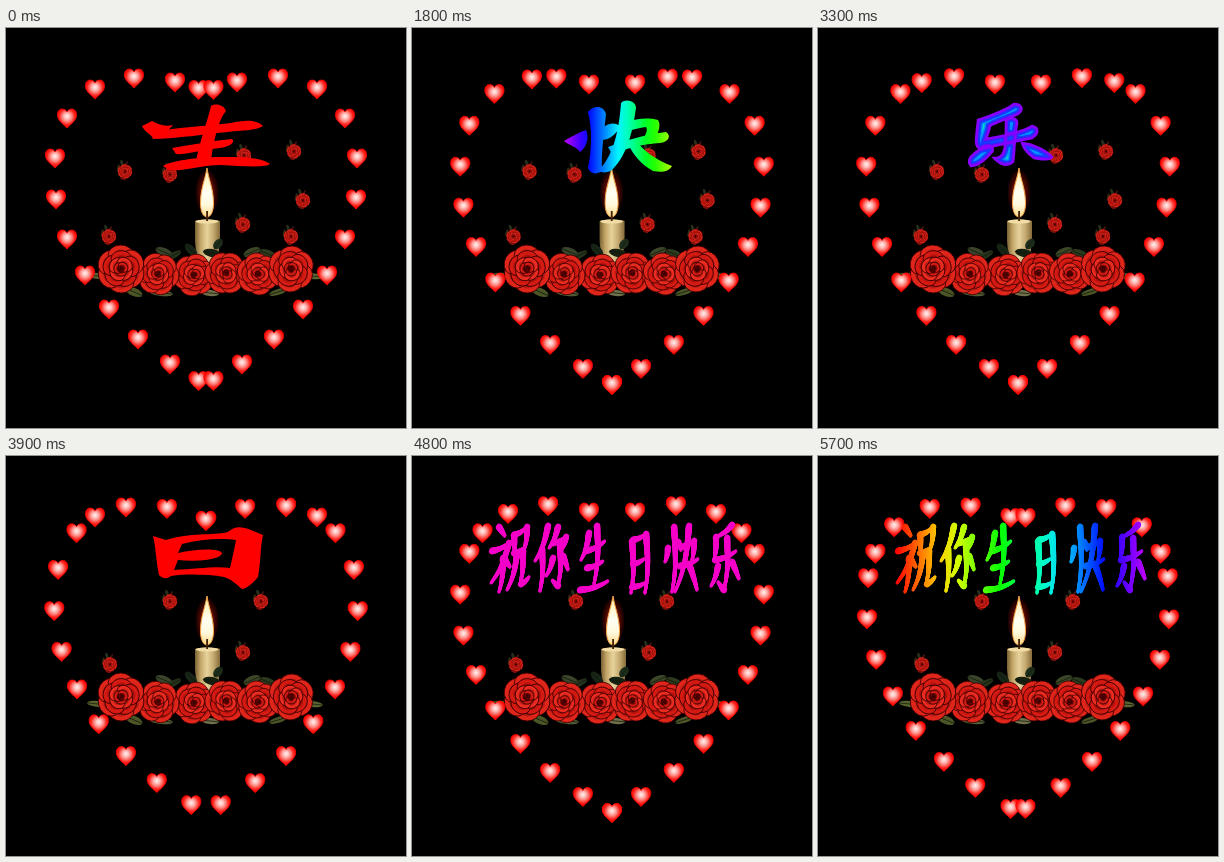
An HTML page with a canvas that plays this animation: 400 px wide and 400 px high, repeating every 6 s.

```html
<!DOCTYPE html>
<html lang="zh">
<head>
<meta charset="utf-8">
<title>生日快乐</title>
<style>
html, body { margin: 0; width: 100%; height: 100%; overflow: hidden; background: #000; }
canvas { display: block; }
</style>
</head>
<body>
<canvas id="stage" width="400" height="400"></canvas>
<script>
const ctx = document.getElementById('stage').getContext('2d');
const STEP = 300, STEPS = 20, TAU = Math.PI * 2;

// ---------- helpers ----------
function at(x, y, draw, scale = 1, turn = 0) {
  ctx.save();
  ctx.translate(x, y);
  ctx.rotate(turn);
  ctx.scale(scale, scale);
  draw();
  ctx.restore();
}
function ellipse(x, y, rx, ry, fill, turn = 0) {
  ctx.beginPath();
  ctx.ellipse(x, y, rx, ry, turn, 0, TAU);
  ctx.fillStyle = fill;
  ctx.fill();
}
function shade(gradient, ...colors) {
  colors.forEach((c, i) => gradient.addColorStop(i / (colors.length - 1), c));
  return gradient;
}
function rainbow(x0, x1, hue0, hue1) {
  const hues = Array.from({ length: 13 }, (_, i) => `hsl(${hue0 + (hue1 - hue0) * i / 12} 100% 50%)`);
  return shade(ctx.createLinearGradient(x0, 0, x1, 0), ...hues);
}

// ---------- travelling hearts ----------
// Left half of the track, one point per five steps, starting one step before the notch.
const TRACK = [[246, 79], [208, 67], [169, 54], [128, 50], [89, 61], [61, 90], [49, 130], [50, 171],
  [61, 211], [79, 247], [103, 281], [132, 311], [164, 336], [200, 356.5], [238, 376]];
const TRACK_END = 59;

function trackPoint(step) {
  const u = (step + 1) / 5, n = Math.min(Math.floor(u), TRACK.length - 4), t = u - n;
  const [a, b, c, d] = TRACK.slice(n, n + 4);
  return [0, 1].map(i => b[i] + t / 2 * (c[i] - a[i]
    + t * (2 * a[i] - 5 * b[i] + 4 * c[i] - d[i] + t * (3 * (b[i] - c[i]) + d[i] - a[i]))));
}
// u is offset so that step -1 lies on the second track point
const heartAt = step => trackPoint(step);

const heartShape = new Path2D('M0 10.5 C-3 7 -10 3 -10 -3 C-10 -8 -7 -9.3 -5 -9.3 C-2.5 -9.3 -.8 -8 0 -6.2 C.8 -8 2.5 -9.3 5 -9.3 C7 -9.3 10 -8 10 -3 C10 3 3 7 0 10.5Z');
const heartFill = shade(ctx.createRadialGradient(0, -2, 0, 0, -1, 10.5),
  '#fff0ee', '#ffc4c0', '#ff807a', '#ff2a24', '#fa0000');

function drawHearts(k) {
  const steps = [1 + k];
  for (let s = k - 3; s >= 0; s -= 5) steps.push(s);
  for (let s = 4 + k; s <= TRACK_END + 2; s += 5) steps.push(s);
  for (const s of steps) {
    const [x, y] = heartAt(Math.min(s, TRACK_END, 58 + k));
    for (const hx of [x, 400 - x]) at(hx, y, () => {
      ctx.fillStyle = heartFill;
      ctx.fill(heartShape);
      ctx.strokeStyle = '#f00';
      ctx.lineWidth = .8;
      ctx.stroke(heartShape);
    }, .96);
  }
}

// ---------- roses and candle ----------
function petals(count, dist, size, start, light, dark) {
  for (let i = 0; i < count; i++) {
    const a = start + i * TAU / count;
    at(Math.cos(a) * dist, Math.sin(a) * dist, () => {
      ellipse(0, 0, size * .8, size, shade(ctx.createRadialGradient(-size * .5, 0, 0, 0, 0, size), dark, dark, light, light), 0);
      ctx.strokeStyle = '#3c0000';
      ctx.lineWidth = .035;
      ctx.stroke();
    }, 1, a);
  }
}
function drawRose(x, y, r, turn) {
  at(x, y, () => {
    ellipse(0, 0, .85, .85, '#500');
    petals(6, .56, .5, 0, '#e0251a', '#4a0000');
    petals(5, .4, .42, .5, '#d41a12', '#600');
    petals(4, .23, .33, .2, '#ec2c20', '#5a0000');
    petals(3, .11, .22, .9, '#d81c14', '#400');
    ctx.strokeStyle = '#4a0000';
    ctx.lineWidth = .06;
    ctx.beginPath();
    ctx.arc(0, 0, .12, 0, 4.4);
    ctx.stroke();
  }, r, turn);
}
function drawBud(x, y) {
  at(x, y, () => {
    ellipse(-2, -7, 1.6, 4, '#26301a', -.3);
    ellipse(-6, -2, 1.3, 4, '#3a2a14', .2);
    ellipse(2, -6, 1.2, 4, '#3c1510', .5);
    drawRose(1, 1.5, 8, .4);
    ellipse(-1, 9, 3, 1.2, '#7c100c', .3);
  }, .95);
}
function leaf(x, y, rx, ry, turn, color) {
  ellipse(x, y, rx, ry, color, turn);
  at(x, y, () => {
    ctx.strokeStyle = '#10180a';
    ctx.lineWidth = .7;
    ctx.beginPath();
    ctx.moveTo(-rx, 0);
    ctx.lineTo(rx, 0);
    ctx.stroke();
  }, 1, turn);
}
const flame = new Path2D('M0 -25 C1.5 -14 6.5 -4 6.5 10 C6.5 18 4 24 0 24 C-4 24 -6.5 18 -6.5 10 C-6.5 -4 -2 -13 0 -25Z');

function drawCandle(x) {
  at(x, 165, () => {
    ctx.save();
    ctx.scale(.5, 1);
    ellipse(0, 0, 23, 23, shade(ctx.createRadialGradient(0, 0, 5, 0, 0, 23), '#a02008', '#6a1004', '#380500', '#100000'));
    ctx.restore();
    const wax = shade(ctx.createLinearGradient(-13, 0, 13, 0), '#6b5527', '#c2a567', '#e8d39c', '#c4a970', '#866c3a');
    ctx.fillStyle = wax;
    ctx.fill(new Path2D('M-12 28 C-8 26 8 26 13 28 L13 44 L11 70 L-10 70 L-12 48Z'));
    ellipse(0, 28.5, 11.5, 2, '#f0dca4');
    ctx.fillStyle = shade(ctx.createLinearGradient(0, -25, 0, 24), '#ffe9a0', '#fff6cc', '#fffef2', '#fff9dc', '#ffd884');
    ctx.fill(flame);
    ctx.strokeStyle = '#f3a348';
    ctx.lineWidth = 1;
    ctx.stroke(flame);
    ctx.fillStyle = '#402008';
    ctx.fillRect(-.8, 18, 1.8, 10);
  });
}
function drawBouquet() {
  for (const [x, y, rx, ry, turn, color] of [
    [92, 248, 11, 3, .1, '#59622e'], [128, 264, 9, 4, .4, '#4b5526'], [155, 265, 12, 3, .1, '#525c34'],
    [158, 224, 9, 4, .4, '#39442a'], [168, 227, 8, 3, -.5, '#26331c'], [185, 222, 8, 4, .8, '#172516'],
    [212, 216, 6, 4, -.9, '#1c2d1b'], [206, 225, 9, 4, .2, '#152011'], [246, 224, 9, 4, -.4, '#3c4728'],
    [262, 226, 9, 4, .4, '#2c3a1e'], [204, 265, 9, 3, .1, '#70704a'], [272, 264, 9, 3, -.3, '#4c5528'],
    [306, 248, 11, 3, .1, '#5c6531']]) leaf(x, y, rx, ry, turn, color);
  for (const [x, y, r, turn] of [[188, 247, 22, .8], [220, 245, 22, 2.1], [152, 246, 22, .2],
    [252, 246, 22, 1.4], [115, 241, 25, .5], [285, 241, 24, 2.7]]) drawRose(x, y, r, turn);
}
const BUDS_MANY = [[118, 142], [163, 145], [237, 126], [287, 122], [296, 171], [236, 195], [284, 207], [102, 207]];
const BUDS_FEW = [[163, 144], [254, 144], [236, 195], [103, 207]];

// ---------- large brush characters 生 日 快 乐 ----------
const BIG = [
  `M136 98 L146 93 C152 96 158 99 167 97 C160 105 152 112 147 111 C146 106 138 104 136 98Z
   M158 102 C180 99 200 98 225 95 C238 92 250 91 257 98 C250 103 235 102 222 104 C200 106 175 110 150 111Z
   M205 78 C210 75 218 77 220 83 C214 90 209 105 205 132 L190 134 C193 115 201 95 205 78Z
   M166 120 C185 117 205 113 226 111 C230 115 222 119 214 120 C195 122 178 127 170 126Z
   M157 138 C165 133 190 129 215 129 C235 129 255 129 264 136 C260 140 235 138 215 137 C195 137 175 144 163 142Z`,
  `M147 80 L160 84 C185 76 205 80 222 76 C228 70 235 70 245 74 L257 79 C254 92 255 105 252 121 C248 126 242 132 236 133 C230 128 225 123 218 121 C200 118 180 118 165 120 C160 124 156 122 153 119 C150 105 150 92 147 80Z
   M176 88 L172 97 C190 93 212 92 216 97 C215 104 190 106 172 104 L168 114 C190 113 210 110 224 112 C226 103 228 95 230 84 C215 82 195 83 176 88Z`,
  `M152 113 C160 108 168 104 174 102 C178 110 174 120 168 124 C164 118 158 118 152 113Z
   M176 84 C182 76 192 78 194 86 C192 105 189 125 190 143 C184 147 178 146 176 140 C180 120 180 100 176 84Z
   M190 100 C200 92 210 96 206 102 C202 108 196 112 190 112Z
   M204 98 C215 93 230 88 246 92 C250 98 245 108 240 116 L230 114 C234 106 236 102 234 99 C225 100 215 104 207 105Z
   M196 119 C215 112 235 106 254 104 C260 108 256 114 248 115 C232 116 215 120 200 126Z
   M209 75 C214 70 224 73 224 80 C221 100 217 125 200 142 C194 146 189 144 186 143 C200 130 207 105 209 75Z
   M216 116 L226 115 C233 124 245 132 260 138 C256 145 248 144 241 143 C230 137 222 128 216 116Z`,
  `M160 92 C172 88 188 82 196 76 C204 76 206 82 200 86 C190 91 178 94 172 98 C171 104 169 108 168 111 C185 108 205 104 214 98 C222 100 220 106 214 110 C195 114 175 118 162 121 C156 118 158 112 160 92Z
   M188 92 C194 88 200 91 199 96 C196 110 197 122 195 134 C190 139 182 137 176 130 C184 130 186 125 187 118 C188 108 188 100 188 92Z
   M165 119 C172 116 177 120 174 124 C168 131 160 138 153 138 C148 132 152 128 165 119Z
   M204 115 C215 116 228 122 234 129 C232 133 222 131 216 130 C210 126 206 122 204 115Z`
].map(d => new Path2D(d));

function drawBig(k) {
  const glyph = BIG[k % 4], style = Math.floor(k / 4);
  ctx.fillStyle = style === 1 ? rainbow(150, 262, 290, 75) : '#f00';
  if (style !== 2) return ctx.fill(glyph);
  // neon contours, from the core outwards
  ctx.save();
  ctx.clip(glyph);
  ctx.fillStyle = '#a8f000';
  ctx.fill(glyph);
  for (const [width, color] of [[20, '#3ce65a'], [15, '#00d8d0'], [11, '#0090ff'], [8, '#1b35ff'], [4, '#5a10ff']]) {
    ctx.strokeStyle = color;
    ctx.lineWidth = width;
    ctx.stroke(glyph);
  }
  ctx.restore();
  ctx.strokeStyle = '#8a00ff';
  ctx.lineWidth = 2.4;
  ctx.stroke(glyph);
}

// ---------- greeting line 祝你生日快乐, brush strokes as x0 y0 x1 y1 ----------
const LINE = [
  '87 71 93 80, 80 95 97 87, 97 87 79 127, 91 102 87 136, 93 104 98 111, 102 79 102 98, 102 79 115 71, 115 71 112 94, 102 97 112 92, 105 98 95 134, 111 95 108 128, 109 128 117 121',
  '136 70 123 105, 130 93 128 135, 146 71 137 92, 141 87 154 81, 154 81 150 93, 148 90 146 130, 146 130 140 124, 141 102 134 120, 151 100 156 114',
  '177 77 169 104, 174 95 193 85, 185 70 182 128, 175 112 191 105, 168 134 196 125',
  '220 85 219 137, 221 84 234 78, 234 78 233 137, 221 108 232 103, 220 131 233 127',
  '256 92 253 106, 262 71 260 136, 266 86 269 94, 270 91 282 85, 282 85 280 104, 268 110 286 103, 277 70 263 136, 277 108 285 134',
  '320 69 304 81, 304 81 302 104, 303 104 324 95, 315 82 312 134, 312 134 306 126, 306 110 299 130, 320 106 327 123'
].join().split(',').map(s => s.trim().split(' ').map(Number));

function brush([x0, y0, x1, y1]) {
  const length = Math.hypot(x1 - x0, y1 - y0), bow = length * .06;
  for (let i = 0; i <= length * 2; i++) {
    const t = i / (length * 2), bend = Math.sin(Math.PI * t) * bow;
    ctx.beginPath();
    ctx.ellipse(x0 + (x1 - x0) * t + bend * .6, y0 + (y1 - y0) * t + bend, 3 - 1.5 * t, 3.4 - 1.6 * t, .5, 0, TAU);
    ctx.fill();
  }
}
function drawLine(k) {
  ctx.fillStyle = k % 2 ? rainbow(78, 328, 0, 285) : '#f500c8';
  LINE.forEach(brush);
}

// ---------- playback ----------
function drawScene(k) {
  ctx.fillStyle = '#000';
  ctx.fillRect(0, 0, 400, 400);
  const sway = k > 0 && k < 8 ? -1.4 : 0;
  drawCandle(201 + sway);
  drawBouquet();
  for (const [x, y] of k < 12 ? BUDS_MANY : BUDS_FEW) drawBud(x + sway, y);
  drawHearts(k);
  if (k < 16) drawBig(k); else drawLine(k);
}
let shown = -1;
function tick() {
  const k = Math.floor(performance.now() / STEP) % STEPS;
  if (k !== shown) drawScene(shown = k);
  requestAnimationFrame(tick);
}
tick();
</script>
</body>
</html>
```
